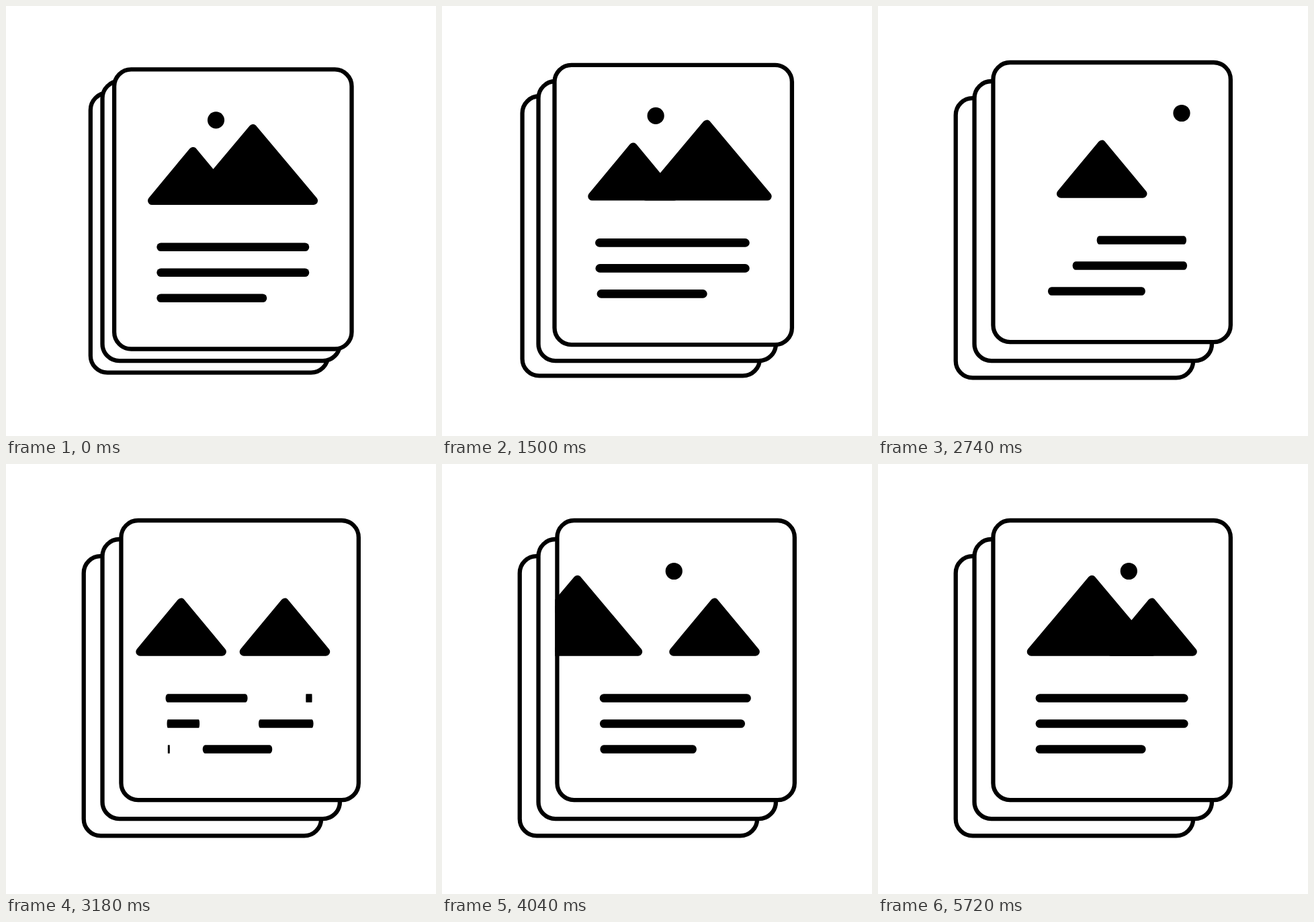
An HTML page that plays this animation: 640 px wide and 640 px high, repeating every 8 s.

```html
<!DOCTYPE html>
<html lang="en">
<head>
<meta charset="utf-8">
<title>Stacked pages</title>
<style>
html, body { margin: 0; width: 100%; height: 100%; overflow: hidden; background: #fff; }
svg { display: block; width: 100vw; height: 100vh; }
.page { fill: #fff; stroke: #000; stroke-width: 6.3; }
.peak { stroke: #000; stroke-width: 12.6; stroke-linejoin: round; }
.bar { stroke: #000; stroke-width: 12.6; stroke-linecap: round; }
</style>
</head>
<body>
<svg viewBox="0 0 640 640">
  <defs>
    <clipPath id="edge"><rect x="158" y="91.2" width="359.7" height="422.4"/></clipPath>
  </defs>
  <rect id="back" class="page" x="125.8" y="129.5" width="353.4" height="416.2" rx="25.2"/>
  <rect class="page" x="143.5" y="112" width="353.4" height="416.2" rx="25.2"/>
  <g id="front">
    <rect class="page" x="161.1" y="94.3" width="353.4" height="416.2" rx="25.2"/>
    <g id="art" clip-path="url(#edge)"></g>
  </g>
</svg>
<script>
const LOOP = 8000, FIRST = 500, LAST = 5720, REST = 6000;
const CYCLE = 560, BEATS = [0, 40, 180, 300, 420];
const art = document.getElementById('art');
const back = document.getElementById('back');
const front = document.getElementById('front');

function add(tag, attrs) {
  const el = document.createElementNS('http://www.w3.org/2000/svg', tag);
  for (const k in attrs) el.setAttribute(k, attrs[k]);
  art.appendChild(el);
  return el;
}

// Back-easing: dips below zero by "pull", then accelerates away by "push".
const swing = (ms, push, pull) => {
  const w = Math.max(0, ms / 1000);
  return w * w * (push * w - pull);
};
const leave = (start, push, pull) => t => swing(t - start, push, pull);
const arrive = (end, push, pull) => t => -swing(end - t, push, pull);

// Cubic Bezier easing with handles (x1, 0) and (x2, 1).
function ease(x1, x2, x) {
  let lo = 0, hi = 1;
  for (let i = 0; i < 30; i++) {
    const s = (lo + hi) / 2, r = 1 - s;
    if (3 * r * s * (r * x1 + s * x2) + s * s * s < x) lo = s; else hi = s;
  }
  return lo * lo * (3 - 2 * lo);
}

const parts = [], bars = [];
const LEFT = 230.6, BASE = 289.7;

function mountain(x, top, half, move) {
  const d = `M${x - half} ${BASE}L${x} ${top}L${x + half} ${BASE}Z`;
  parts.push({ el: add('path', { class: 'peak', d }), move });
}

function picture(place, small, sun, big) {
  mountain(place(278.3), 216.2, 61, small);
  mountain(place(367.5), 182.3, 90.3, big);
  const el = add('circle', { cx: place(312.5), cy: 169.8, r: 12.6 });
  parts.push({ el, move: sun });
}

// Each bar shrinks towards its right end while its successor grows from the left.
function bar(y, length, out, into) {
  const right = LEFT + length;
  for (const [pin, size] of [[right, t => 1 - out(t)], [LEFT, t => 1 + into(t)]]) {
    const el = add('line', { class: 'bar', x1: LEFT - pin, x2: right - pin });
    bars.push({ el, pin, y, size });
  }
}

picture(x => x,
  leave(1400, 34.2, 21), leave(700, 26, 22), leave(460, 34.3, 17));
picture(x => 675.5 - x,
  arrive(5100, 44.3, 45.2), arrive(5405, 44, 45), arrive(5780, 44, 38));

bar(358.8, 214.4, leave(1000, 0.149, 0.123), arrive(4800, 0.189, 0.13));
bar(396.8, 214.4, leave(1100, 0.126, 0.114), arrive(5060, 0.205, 0.163));
bar(434.8, 151.4, leave(1400, 0.117, 0.092), arrive(5400, 0.153, 0.1405));

// The picture advances on an uneven beat.
function beat(t) {
  if (t < FIRST) return 0;
  if (t >= LAST) return REST;
  const phase = (t - 80) % CYCLE;
  return t - phase + BEATS.filter(b => b <= phase).pop();
}

function draw(t) {
  const e = ease(0.58, 0.22, Math.min(1, Math.max(0, (t - 450) / 2250)));
  front.setAttribute('transform', `translate(${10.3 * e} ${-10.3 * e})`);
  back.setAttribute('transform', `translate(${-10.1 * e} ${7.7 * e})`);
  for (const p of parts) p.el.setAttribute('transform', `translate(${p.move(t)} 0)`);
  for (const b of bars) {
    const s = b.size(t);
    b.el.setAttribute('visibility', s > 0 ? 'visible' : 'hidden');
    b.el.setAttribute('transform', `translate(${b.pin} ${b.y}) scale(${Math.max(s, 0.001)} 1)`);
  }
}

const begin = performance.now();
function tick() {
  draw(beat((performance.now() - begin) % LOOP));
  requestAnimationFrame(tick);
}
tick();
</script>
</body>
</html>
```
